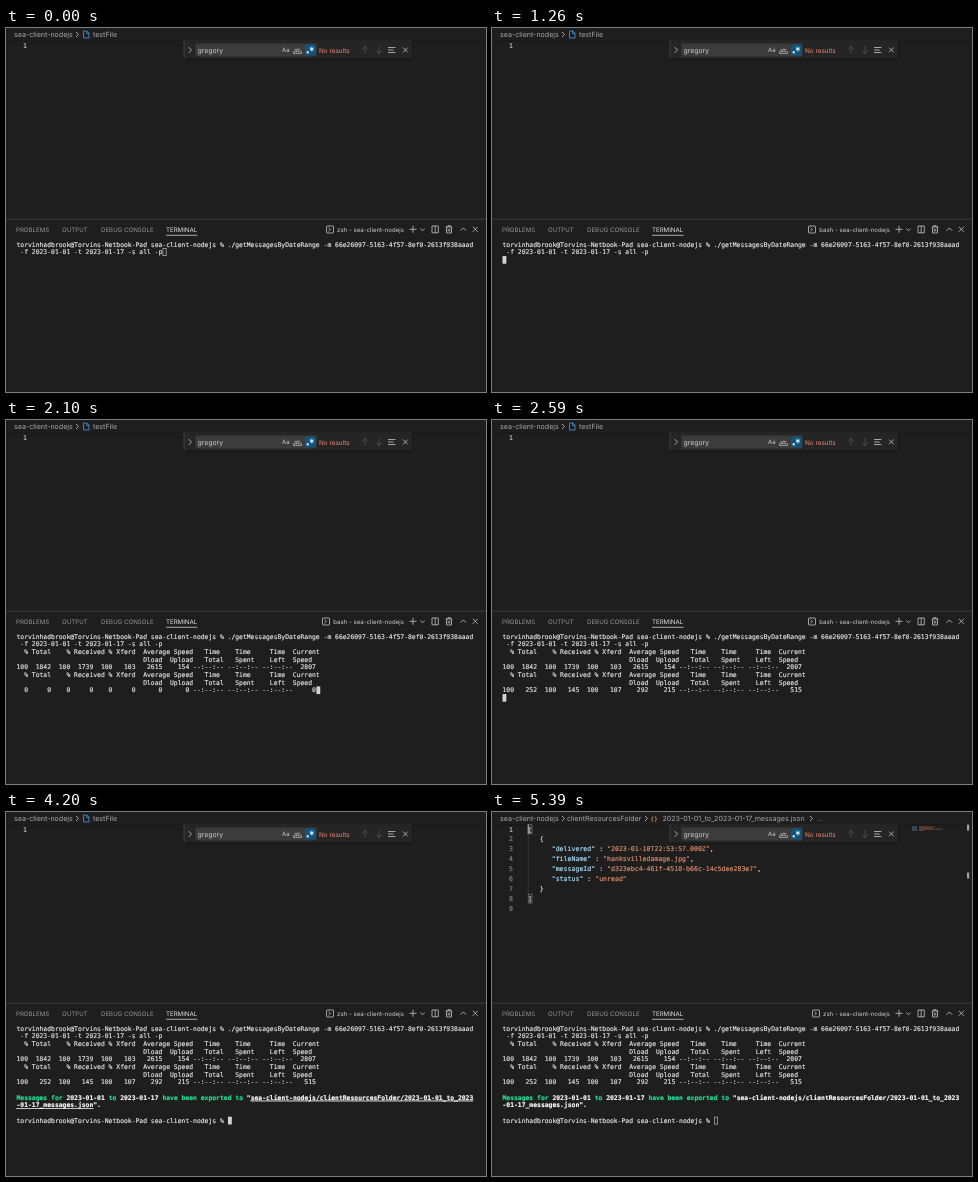
Recreate the animation shown at these times as an HTML page. Size 480 by 364 pixels, loop 5460 ms.

```html
<!DOCTYPE html>
<html lang="en">
<head>
<meta charset="utf-8">
<title>Terminal export</title>
<style>
  html, body { margin: 0; width: 100%; height: 100%; overflow: hidden; background: #1e1e1e; }
  svg { display: block; width: 480px; height: 364px; }
  text { white-space: pre; text-rendering: geometricPrecision; }
  .ui { font-family: Inter, sans-serif; }
  .term, .code { font-family: "DejaVu Sans Mono", monospace; fill: currentColor; stroke: currentColor; stroke-width: .16; }
  .term { font-size: 6.386px; color: #e6e6e6; }
  .code { font-size: 6.57px; color: #dcdcdc; }
  .icon path, .icon rect { fill: none; stroke: #c5c5c5; stroke-width: .8; }
  .icon .dim { stroke: #5a5a5a; }
  .green { color: #23e09a; }
  .white { color: #fff; }
  .key { color: #a8e0fc; }
  .string { color: #df8e6c; }
  .link { text-decoration: underline; }
</style>
</head>
<body>
<svg viewBox="0 0 480 364">
  <path d="M0 12.6H480" stroke="#181818" stroke-width=".9"/>
  <path d="M36 22.2H415" stroke="#282828" stroke-width=".7"/>
  <g id="editor"></g>

  <rect x="177" y="12" width="230" height="20" fill="#111" opacity=".5"/>
  <rect x="178" y="12" width="228" height="18.5" fill="#252526"/>
  <path d="M178 12V30.5" stroke="#454545"/>
  <rect x="189.5" y="15.5" width="121" height="13" fill="#3c3c3c"/>
  <rect x="299" y="16.8" width="10.5" height="10.5" rx="1" fill="#0e567f"/>
  <g class="ui" fill="#ccc">
    <text x="191.5" y="24.5" font-size="6.9">gregory</text>
    <text x="276" y="24.2" font-size="6">Aa</text>
    <text x="288" y="23.6" font-size="5.6">ab</text>
    <text x="313" y="24.5" font-size="6.4" fill="#f48771">No results</text>
  </g>
  <rect x="300.7" y="23.3" width="2" height="2" fill="#fff"/>
  <path d="M305.8 18.6V23.4M303.7 19.8L307.9 22.2M307.9 19.8L303.7 22.2" stroke="#fff" stroke-width=".8"/>
  <g class="icon">
    <path d="M182.5 19L185.5 22L182.5 25M287.5 23.5V25.3H295.5V23.5"/>
    <path class="dim" d="M359 25.5V18.5M356 21.5L359 18.5L362 21.5M373 18.5V25.5M370 22.5L373 25.5L376 22.5"/>
    <path d="M382 19.5H389.5M382 22H387.5M382 24.5H389.5M397 19.5L401.8 24.3M401.8 19.5L397 24.3"/>
  </g>

  <path d="M0 191.2H480" stroke="#474747" stroke-width=".8"/>
  <g class="ui" font-size="6.15" fill="#969696">
    <text x="10" y="203.8">PROBLEMS</text>
    <text x="56" y="203.8">OUTPUT</text>
    <text x="95" y="203.8">DEBUG CONSOLE</text>
    <text x="160" y="203.8" fill="#e7e7e7">TERMINAL</text>
  </g>
  <path d="M160 207.3H191.5" stroke="#e7e7e7" stroke-width=".7"/>
  <g class="icon">
    <path d="M403.5 201.3H410.5M407 197.8V204.8M414.3 200.5L416.5 202.7L418.7 200.5"/>
    <path d="M426 198H432.3V204.8H426ZM429.2 198V204.8"/>
    <path d="M439.7 199H446.3M441.8 199V197.6H444.2V199M440.5 199V205H445.5V199M442.2 200.8V203.5M443.8 200.8V203.5"/>
    <path d="M454.5 202.7L457.3 199.9L460.1 202.7M466.8 198.8L471.8 203.8M471.8 198.8L466.8 203.8"/>
  </g>
  <g id="panel"></g>
</svg>
<script>
const LOOP = 5460;
const FOCUS = 490, ENTER = 840, SHELL = 980, FIRST = 1330, SECOND = 2030,
      FINISHED = 2520, PROMPT = 2660, HOVER = 3710, OPEN = 4270, BLINK = 4830, UNBLINK = 5320;

const COL = 3.845, ROW = 7.67, LEFT = 10.5, TOP = 212.7;
const EDIT_ROW = 9.9, EDIT_LEFT = 36;

const span = (cls, s) => `<tspan class="${cls}">${s}</tspan>`;
const bold = (cls, s) => `<tspan class="${cls}" font-weight="bold">${s}</tspan>`;
const rect = (x, y, w, h, fill) => `<rect x="${x}" y="${y}" width="${w}" height="${h}" fill="${fill}"/>`;
const ui = (x, y, size, fill, s, extra = '') =>
  `<text class="ui" x="${x}" y="${y}" font-size="${size}" fill="${fill}" ${extra}>${s}</text>`;

const prompt = 'torvinhadbrook@Torvins-Netbook-Pad sea-client-nodejs % ';
const command = [
  prompt + './getMessagesByDateRange -m 66e26097-5163-4f57-8ef0-2613f938aaad',
  ' -f 2023-01-01 -t 2023-01-17 -s all -p'
];
const header = [
  '  % Total    % Received % Xferd  Average Speed   Time    Time     Time  Current',
  '                                 Dload  Upload   Total   Spent    Left  Speed'
];

function transfer(pct, total, got, sent, down, up, speed) {
  const pad = (v, n) => String(v).padStart(n);
  return pad(pct, 3) + pad(total, 6) + pad(pct, 5) + pad(got, 6) + pad(pct, 5) + pad(sent, 6) +
    pad(down, 7) + pad(up, 7) + ' --:--:--'.repeat(3) + pad(speed, 6);
}
const pending = transfer(0, 0, 0, 0, 0, 0, 0);

function exported(hover) {
  const link = hover ? 'white link' : 'white';
  return [
    bold('green', 'Messages for ') + bold('white', '2023-01-01') + bold('green', ' to ') +
    bold('white', '2023-01-17') + bold('green', ' have been exported to ') + bold('white', '"') +
    bold(link, 'sea-client-nodejs/clientResourcesFolder/2023-01-01_to_2023'),
    bold(link, '-01-17_messages.json') + bold('white', '".')
  ];
}

// Returns the printed lines and the cursor column on the last one.
function terminalState(t) {
  const lines = [...command];
  if (t < ENTER) return [lines, command[1].length];
  if (t < FIRST) return [[...lines, ''], 0];
  lines.push(...header);
  if (t < SECOND) return [[...lines, pending], pending.length];
  lines.push(transfer(100, 1842, 1739, 103, 2615, 154, 2807), ...header);
  if (t < FINISHED) return [[...lines, pending], pending.length];
  lines.push(transfer(100, 252, 145, 107, 292, 215, 515), '');
  if (t < PROMPT) return [lines, 0];
  lines.push(...exported(t >= HOVER && t < OPEN), '', prompt);
  return [lines, prompt.length];
}

function drawPanel(t) {
  const [lines, col] = terminalState(t);
  const bash = t >= SHELL && t < PROMPT;
  const focused = t >= FOCUS && t < OPEN;
  const x = LEFT + col * COL, y = TOP + (lines.length - 1) * ROW;
  const ix = bash ? 317 : 321;
  const cursor = focused
    ? rect(x, y, COL, ROW, '#d4d4d4')
    : `<rect x="${x + .3}" y="${y + .3}" width="${COL - .6}" height="${ROW - .6}" fill="none" stroke="#d4d4d4" stroke-width=".6"/>`;
  return `<g class="icon"><rect x="${ix - .5}" y="198" width="7" height="7" rx=".6"/>
    <path d="M${ix + 1.5} 199.8L${ix + 3.5} 201.5L${ix + 1.5} 203.2"/></g>` +
    ui(398, 203.6, 6.1, '#ccc', `${bash ? 'bash' : 'zsh'} - sea-client-nodejs`, 'text-anchor="end"') +
    lines.map((s, i) => `<text class="term" x="${LEFT}" y="${TOP + 5.9 + i * ROW}">${s}</text>`).join('') +
    cursor;
}

const entry = (key, value, end = ',') =>
  '      ' + span('key', `"${key}"`) + ' : ' + span('string', `"${value}"`) + end;
const json = [
  '[', '   {',
  entry('delivered', '2023-01-10T22:53:57.000Z'),
  entry('fileName', 'hanksvilledamage.jpg'),
  entry('messageId', 'd323ebc4-461f-4510-b66c-14c5dee283e7'),
  entry('status', 'unread', ''),
  '   }', ']', ''
];

// Overview of the open file: key and value strips, plus the bracket marks on the ruler.
function drawMinimap() {
  const values = [26, 22, 38, 8];
  return values.map((n, i) => {
    const y = 14.6 + i * 1.1;
    return rect(420, y, 5, .7, '#4c6d7c') + rect(427, y, n * .6, .7, '#8a553f');
  }).join('') + rect(475, 12.5, 2.2, 6, '#a0a0a0') + rect(475, 60.5, 2.2, 6, '#a0a0a0');
}

function drawEditor(t) {
  const open = t >= OPEN;
  const crumb = (x, s) => ui(x, 9, 7.09, '#a9a9a9', s);
  const chevron = x => `<path d="M${x} 4L${x + 2.5} 6.5L${x} 9"/>`;
  let out = crumb(8, 'sea-client-nodejs');
  if (open) {
    out += crumb(75, 'clientResourcesFolder') + ui(158.8, 8.8, 6, '#d78b4a', '{}', 'font-weight="bold" letter-spacing=".8"') +
      crumb(170.5, '2023-01-01_to_2023-01-17_messages.json') + crumb(324.5, '...') +
      `<g class="icon">${[70, 153, 318].map(chevron).join('')}</g>` +
      `<path d="M${EDIT_LEFT + .3} 22.5V82" stroke="#404040" stroke-width=".6"/>` + drawMinimap();
  } else {
    out += crumb(87, 'testFile') +
      `<g class="icon">${chevron(70)}<path style="stroke:#3b9ddd" d="M77.5 3H80.8L83 5.2V10H77.5ZM80.6 3V5.4H83"/></g>`;
  }
  (open ? json : ['']).forEach((line, i) => {
    const y = 19.5 + i * EDIT_ROW;
    const bracket = line === '[' || line === ']';
    if (bracket) out += `<rect x="${EDIT_LEFT + .2}" y="${y - 6.7}" width="3.8" height="9" fill="#1d251d" stroke="#888" stroke-width=".6"/>`;
    out += `<text class="code" x="21" y="${y}" text-anchor="end" style="color:${i ? '#858585' : '#c6c6c6'}">${i + 1}</text>` +
      `<text class="code" x="${EDIT_LEFT}" y="${y}">${line}</text>`;
  });
  if (open && (t < BLINK || t >= UNBLINK)) out += rect(EDIT_LEFT - .3, 12.4, 1, 9.8, '#aeafad');
  return out;
}

const shown = {};
function show(id, markup) {
  if (shown[id] === markup) return;
  shown[id] = markup;
  document.getElementById(id).innerHTML = markup;
}

const start = performance.now();
function frame() {
  const t = (performance.now() - start) % LOOP;
  show('editor', drawEditor(t));
  show('panel', drawPanel(t));
  requestAnimationFrame(frame);
}
frame();
</script>
</body>
</html>
```
